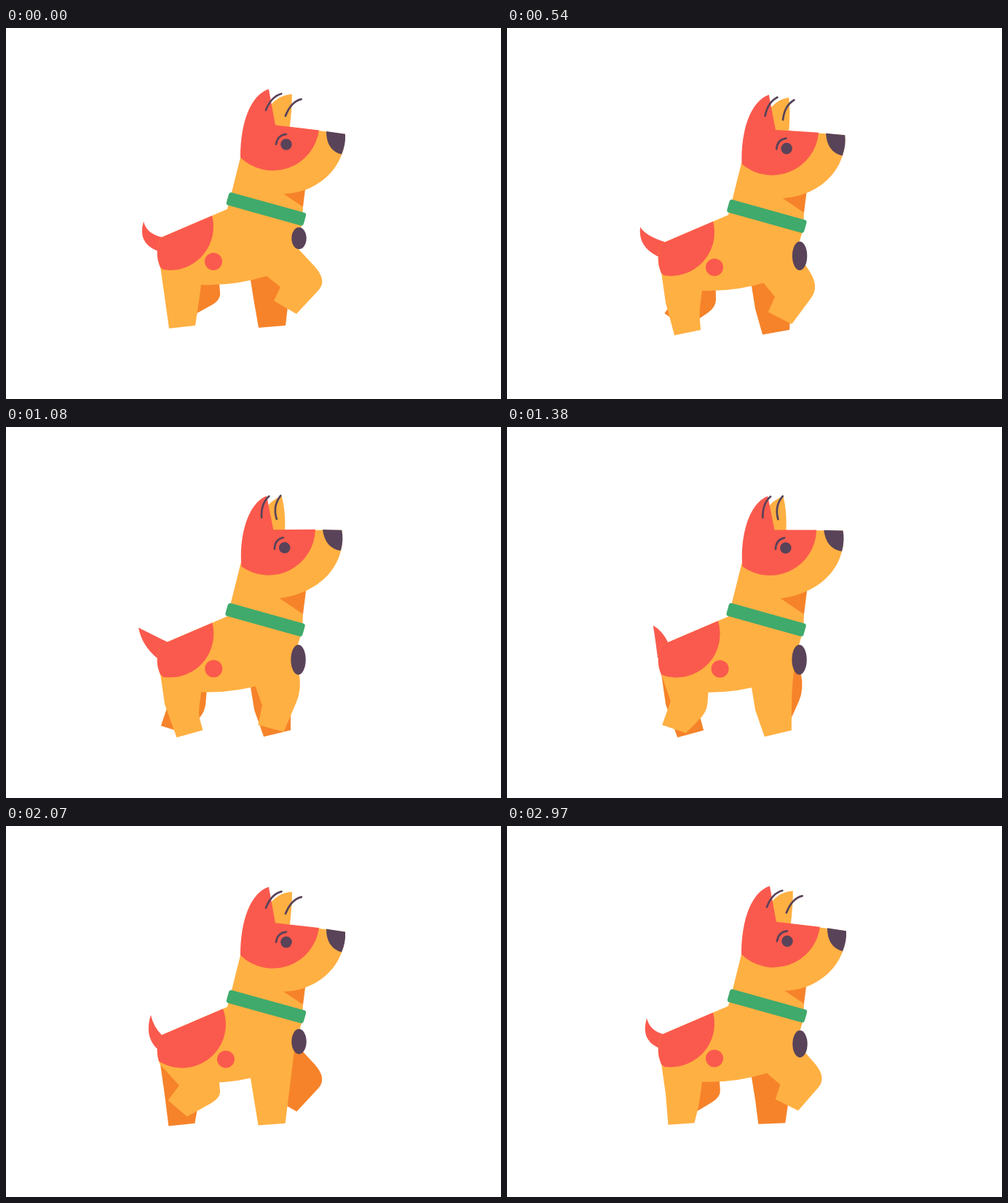
Animation, 680 px wide and 510 px high, one loop 3 s. Source, as an HTML page with a canvas:

```html
<!DOCTYPE html>
<html lang="en">
<head>
<meta charset="utf-8">
<title>Walking dog</title>
<style>
html, body { margin: 0; width: 100%; height: 100%; overflow: hidden; background: #fff; }
canvas { display: block; }
</style>
</head>
<body>
<canvas id="stage" width="680" height="510"></canvas>
<script>
const ctx = document.getElementById('stage').getContext('2d');
const { sin, cos, cbrt, abs, min, floor, PI } = Math;
const LOOP = 3000, FRAME = 30, STRIDE = 590;
const YELLOW = '#ffb042', RED = '#fa5a4d', ORANGE = '#f6832a', PURPLE = '#594359', GREEN = '#3faa6c';

// Leg outlines: hip, back knee, heel, toe, front knee, front hip
const HIND = {
  planted: [212, 328, 218, 370, 224, 413, 260, 409, 264, 383, 268, 353],
  raised: [212, 328, 238, 357, 222, 377, 248, 400, 295, 374, 293, 352],
  sway: 12
};
const FORE = {
  planted: [336, 347, 341, 378, 347, 412, 384, 409, 391, 350, 397, 300],
  raised: [358, 341, 377, 356, 368, 375, 399, 393, 442, 347, 400, 302],
  sway: 8
};
const BODY = 'M323 174L310 226 304 249 213 288Q203 308 212 329L228 343 240 350 268 353' +
  'Q312 355 358 341L390 332 398 298 407 268 408 246 380 222Z';

const mix = (a, b, k) => a + (b - a) * k;
const bend = a => (1 - cos(a)) / 2;

function fill(path, color) {
  ctx.fillStyle = color;
  ctx.fill(new Path2D(path));
}

function stroke(path) {
  ctx.strokeStyle = PURPLE;
  ctx.lineWidth = 2.7;
  ctx.lineCap = 'round';
  ctx.stroke(new Path2D(path));
}

function ellipse(x, y, rx, ry, color) {
  ctx.fillStyle = color;
  ctx.beginPath();
  ctx.ellipse(x, y, rx, ry, 0, 0, 7);
  ctx.fill();
}

// The foot sways and tilts with the stride; the leg folds around half a stride
function leg({ planted, raised, sway }, a, color) {
  const fold = bend(a) ** 4, s = sin(a);
  const [ax, ay, bx, by, cx, cy, dx, dy, ex, ey, fx, fy] = planted.map((v, i) => mix(v, raised[i], fold));
  const heel = [cx - sway * s, cy - 3 * s], toe = [dx - sway * s, dy + 4 * s];
  fill(`M${ax} ${ay}L${bx} ${by} ${heel} ${toe} ${mix(toe[0], ex, .7)} ${mix(toe[1], ey, .7)}` +
    `Q${ex} ${ey} ${mix(ex, fx, .45)} ${mix(ey, fy, .45)}` +
    `L${fx} ${fy} ${(ax + fx) / 2} ${min(ay, fy) - 12}Z`, color);
}

function tail(a, lift) {
  const x = 194 - 5 * cos(a) + 8 * sin(a) + 3 * sin(2 * a), y = 263 + 3 * cos(a);
  const joint = 214 + 8 * lift;
  fill(`M${joint} ${288 - .42 * (joint - 213)}Q${x + 4 + 9 * lift} ${y + 17 - 11 * lift} ${x} ${y}` +
    `Q${x - 9 + 14 * lift} ${y + 29 - 5 * lift} 207 306L225 310Z`, RED);
}

function patch(a) {
  const x = 285 + 17 * bend(a) ** 3;
  ctx.save();
  ctx.clip(new Path2D(BODY));
  ellipse(x - 60, 273, 60, 60, RED);
  ctx.restore();
  ellipse(x, 321, 12, 12, RED);
}

function collar(lift) {
  ctx.save();
  ctx.translate(357.5 - 1.5 * lift, 248.7 + 5.3 * lift);
  ctx.rotate(.272);
  ctx.fillStyle = GREEN;
  ctx.beginPath();
  ctx.roundRect(-55, -9.2, 110, 18.4, 3.5);
  ctx.fill();
  ctx.restore();
}

function tag(a, lift) {
  const pull = cbrt(abs(sin(a)));
  ellipse(402.5 - lift, 289 + 20.5 * pull, 10.2, 15 + 6 * pull, PURPLE);
}

// lift: 0 is nose lowered, 1 is nose level
function head(lift) {
  const at = (a, b) => mix(a, b, lift);
  ctx.save();
  ctx.translate(330 + lift, 182 + 1.5 * lift);
  ctx.rotate(-.133 * lift);
  ctx.translate(-330, -182);
  fill(`M362 108Q374 92 ${at(393, 390)} ${at(91, 89)}Q393 110 ${at(390, 388.5)} 136L362 140Z`, YELLOW);
  fill(`M${at(322, 323)} 178L340 133 370 133.5 466 146C466 195 425 228 ${at(380, 368)} 228L322 200Z`, YELLOW);
  fill(`M${at(361, 370)} ${at(84, 86.5)}C${at(336, 343)} ${at(92, 93)} ${at(322, 325)} ${at(130, 136)} ${at(322, 323)} 178` +
    `A64 64 0 0 0 430 140.5L${at(370, 373)} 133.5Z`, RED);
  fill('M440 142L466 146Q467 160 461 174Q440 168 440 142Z', PURPLE);
  ellipse(385, 160, 7.8, 7.8, PURPLE);
  stroke('M371 160Q373 147 385 146');
  stroke(`M${at(357, 359)} ${at(113, 115)}Q${at(364.5, 360)} ${at(94, 96)} ${at(378.5, 372.5)} ${at(90.5, 87)}`);
  stroke(`M${at(384, 379)} ${at(121, 119.5)}Q${at(392, 375)} 101 ${at(406, 388)} ${at(98, 88)}`);
  ctx.restore();
}

function draw(t) {
  const a = 2 * PI * t / STRIDE, opposite = a + PI;
  const lift = .566 * (1 - cos(2 * a - .21));
  const b = 2 * a - 4.41;
  const bob = 2.5 + 9 * cos(b) - 1.4 * sin(2 * b) + .9 * sin(3 * b);
  ctx.clearRect(0, 0, 680, 510);
  ctx.save();
  ctx.translate(0, bob);
  leg(HIND, opposite, ORANGE);
  leg(FORE, a, ORANGE);
  tail(a, lift);
  fill(BODY, YELLOW);
  leg(HIND, a, YELLOW);
  leg(FORE, opposite, YELLOW);
  patch(a);
  fill(`M${mix(380, 374, lift)} ${mix(227, 223, lift)}L385 205 413 206 408 246Z`, ORANGE);
  collar(lift);
  tag(a, lift);
  head(lift);
  ctx.restore();
}

const start = performance.now();
function tick() {
  const now = (performance.now() - start) % LOOP;
  draw(floor(now / FRAME) * FRAME % STRIDE);
  requestAnimationFrame(tick);
}
tick();
</script>
</body>
</html>
```
